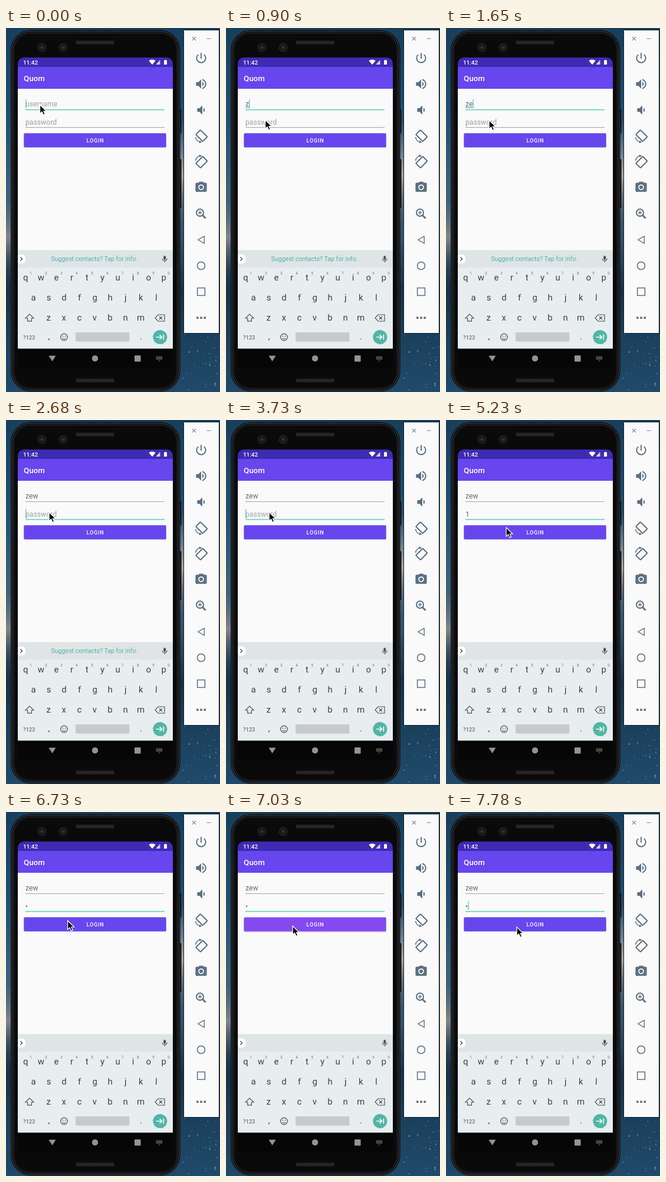
An HTML page that plays this animation: 363 by 617 pixels, repeating every 8 s.

```html
<!DOCTYPE html>
<html lang="en">
<head>
<meta charset="utf-8">
<title>Login screen</title>
<style>
html, body { margin: 0; width: 100%; height: 100%; overflow: hidden; background: #173a57; }
svg { display: block; width: 363px; height: 617px; font-family: Roboto, sans-serif; }
.mid { text-anchor: middle; }
.icon { fill: #5b7080; }
.line { fill: none; stroke: #5b7080; stroke-width: 2; }
.key { fill: #3b4347; font-size: 15px; }
.hint { fill: #a0a0a0; font-size: 12.2px; }
.typed { fill: #6a6a6a; font-size: 12.2px; }
</style>
</head>
<body>
<svg viewBox="0 0 363 617">
  <defs>
    <linearGradient id="sky" x2="0" y2="1">
      <stop offset="0" stop-color="#173f5c"/>
      <stop offset=".25" stop-color="#1f5075"/>
      <stop offset=".45" stop-color="#3b637f"/>
      <stop offset=".58" stop-color="#34526b"/>
      <stop offset=".72" stop-color="#16324a"/>
      <stop offset=".86" stop-color="#1b415d"/>
      <stop offset="1" stop-color="#20496a"/>
    </linearGradient>
    <linearGradient id="ridge" x2="0" y2="1">
      <stop offset="0" stop-color="#8796a5" stop-opacity="0"/>
      <stop offset=".5" stop-color="#b3a59e"/>
      <stop offset="1" stop-color="#3a4b5e" stop-opacity="0"/>
    </linearGradient>
    <pattern id="mesh" width="3" height="3" patternUnits="userSpaceOnUse">
      <rect width="3" height="3" fill="#151515"/>
      <path d="M0 3 3 0M0 0 3 3" stroke="#3c3c3c" stroke-width=".7"/>
    </pattern>
    <clipPath id="screen"><path d="M20 576V62q0-12 12-12h239q12 0 12 12v514z"/></clipPath>
  </defs>

  <rect width="363" height="617" fill="url(#sky)"/>
  <rect x="294" y="160" width="8" height="180" fill="url(#ridge)"/>
  <rect y="290" width="10" height="130" fill="url(#ridge)" opacity=".6"/>
  <g id="stars" fill="#c4d8e6"></g>

  <!-- phone -->
  <rect x="293" y="137" width="4.5" height="42" rx="1.5" fill="#231e1d"/>
  <rect x="293" y="222" width="4.5" height="83" rx="1.5" fill="#231e1d"/>
  <rect x="8" y="3.5" width="287.5" height="612.5" rx="34" fill="#080809"/>
  <rect x="10" y="5.5" width="283.5" height="608.5" rx="32" fill="none" stroke="#3b3c3f" stroke-width="1.4"/>
  <rect x="13" y="8.5" width="277.5" height="602.5" rx="29" fill="#0a0a0b" stroke="#343538"/>
  <rect x="118" y="21.5" width="66" height="6" rx="3" fill="url(#mesh)"/>
  <rect x="118" y="594.5" width="66" height="6" rx="3" fill="url(#mesh)"/>
  <g fill="#191919" stroke="#272727">
    <circle cx="61" cy="33" r="7"/><circle cx="97" cy="33" r="7"/>
  </g>
  <g fill="#36302e"><circle cx="61" cy="33" r="2.5"/><circle cx="97" cy="33" r="2.5"/></g>

  <g clip-path="url(#screen)">
    <rect x="20" y="50" width="263" height="526" fill="#060606"/>
    <rect x="20" y="103" width="263" height="274" fill="#fafafa"/>
    <rect x="20" y="50" width="263" height="16" fill="#3d2bb2"/>
    <rect x="20" y="66" width="263" height="37" fill="#6746ee"/>
    <g fill="#fff">
      <text x="29" y="62" font-size="9.9" font-weight="500">11:42</text>
      <path d="M242.3 55.6q5.7-4 11.4 0l-5.7 6.7z"/>
      <path d="M254 62h7.5v-8z" opacity=".75"/>
      <path d="M268 55h1.2v-1h2.6v1h1.2v7h-5z"/>
      <text x="30" y="90" font-size="13.3" font-weight="500">Quom</text>
    </g>

    <!-- form -->
    <text id="userHint" class="hint" x="33" y="133.3">username</text>
    <text id="user" class="typed" x="33" y="133.3"></text>
    <rect id="compose" x="33" y="134.4" height="1" fill="#777"/>
    <rect id="userLine" x="33" width="236"/>
    <text id="passHint" class="hint" x="33" y="163.5">password</text>
    <text id="pass" class="typed" x="33" y="163.5"></text>
    <rect id="passLine" x="33" width="236"/>
    <rect id="caret" width="1.4" height="15" fill="#62cfbc"/>
    <rect id="shadow" x="30" width="242" height="25" rx="2.5" fill="#40307a" opacity=".22"/>
    <rect id="button" x="30.4" y="178.4" width="241.2" height="23.8" rx="2"/>
    <text class="mid" x="151.5" y="193.8" fill="#fff" font-size="9" font-weight="500" letter-spacing=".8">LOGIN</text>

    <!-- keyboard -->
    <rect x="20" y="376.5" width="263" height="30" fill="#dfe4e7"/>
    <rect x="20" y="406" width="263" height="137.5" fill="#e8edf0"/>
    <circle cx="25.5" cy="391.5" r="8" fill="#fff"/>
    <path d="m24.3 388.3 3.2 3.2-3.2 3.2" fill="none" stroke="#444" stroke-width="1.3"/>
    <text id="suggest" class="mid" x="150" y="395.4" font-size="10.63" fill="#51b5a4">Suggest contacts? Tap for info.</text>
    <rect x="267.2" y="386" width="4" height="7.2" rx="2" fill="#50585c"/>
    <path d="M265.2 390.8a4 4 0 0 0 8 0M269.2 394.8v2.4" fill="none" stroke="#50585c" stroke-width="1.2"/>
    <g id="keys"></g>
    <g fill="none" stroke="#4b5357" stroke-width="1.2">
      <path d="m40 485-7 7h3.6v4.8h6.8V492H47z"/>
      <path d="M258 486h11v11h-11l-5-5.5zM260 489l5 5m0-5-5 5"/>
      <circle cx="98.5" cy="524" r="5.8"/>
      <path d="M95.5 525.8q3 3 6 0"/>
    </g>
    <g fill="#4b5357"><circle cx="96.5" cy="522.3" r=".9"/><circle cx="100.5" cy="522.3" r=".9"/></g>
    <text x="29" y="527.5" font-size="9.4" fill="#4b5357">?123</text>
    <text class="key mid" x="73" y="528">,</text>
    <text class="key mid" x="229" y="528">.</text>
    <rect x="118" y="516" width="91.5" height="15.5" rx="1.5" fill="#c6cacc"/>
    <circle cx="261.3" cy="524" r="12" fill="#51b6a6"/>
    <path d="M255 524h9.5m-4-4 4 4-4 4M267.3 519.5v9" fill="none" stroke="#fff" stroke-width="1.5"/>

    <!-- navigation bar -->
    <g fill="#949494">
      <path d="M72.5 555.5h12l-6 9.5z"/>
      <circle cx="151" cy="560" r="5.2"/>
      <rect x="218" y="555" width="10.5" height="10.5" rx="1"/>
      <rect x="254.5" y="556.5" width="10.5" height="5.5" rx=".8" opacity=".6"/>
      <path d="m258 563.5 2 2 2-2z" opacity=".6"/>
    </g>
    <path d="M255.5 558.2h8.5M255.5 560.2h8.5" stroke="#060606" stroke-dasharray="1.2 .8"/>
  </g>

  <!-- side toolbar -->
  <rect x="301.5" y="3.5" width="60" height="514" fill="#fbfafb" stroke="#101c28"/>
  <path d="m315.8 14.8 6.4 6.4m0-6.4-6.4 6.4M340.5 18h7" stroke="#777f85" stroke-width="1.1"/>
  <g id="tools" class="icon"></g>
  <g class="line">
    <g id="turn">
      <rect x="326.3" y="174.3" width="11" height="16.5" rx="1" transform="rotate(-45 331.8 182.6)"/>
      <path d="M321.5 185a10 10 0 0 0 8.5 8.5" stroke-width="1.6"/>
      <path d="m328.2 190.5 4.3 3.2-4.8 1.6z" fill="#5b7080" stroke="none"/>
    </g>
    <use href="#turn" transform="matrix(1 0 0 -1 0 410)"/>
    <circle cx="329" cy="313" r="6"/>
    <path d="m333.3 317.3 5.4 5.4" stroke-width="2.8"/>
    <path d="M326 313h6m-3-3v6" stroke-width="1.5"/>
    <path d="M336.2 353v12l-10.4-6z" stroke-width="1.4"/>
    <circle cx="331" cy="403" r="6.5" stroke-width="1.6"/>
    <rect x="324.6" y="440.6" width="12.8" height="12.8" stroke-width="1.5"/>
  </g>
  <g class="icon"><circle cx="324.8" cy="491.2" r="2"/><circle cx="331" cy="491.2" r="2"/><circle cx="337.2" cy="491.2" r="2"/></g>

  <path id="pointer" d="M-.4-.3V14.6L3-.3 3 11.4l2.6 5.5 2.6-1.1-2.4-5.3h4.7z" fill="#000" stroke="#fff" stroke-width="1.2"/>
</svg>

<script>
const $ = id => document.getElementById(id);

function add(parent, tag, attrs, text = '') {
  const node = document.createElementNS('http://www.w3.org/2000/svg', tag);
  for (const [name, value] of Object.entries(attrs)) node.setAttribute(name, value);
  node.textContent = text;
  $(parent).append(node);
}

function keyRow(letters, x, y) {
  [...letters].forEach((letter, i) =>
    add('keys', 'text', { class: 'key mid', x: x + i * 26.05, y }, letter));
}
keyRow('qwertyuiop', 33.3, 428);
keyRow('asdfghjkl', 46.5, 461.7);
keyRow('zxcvbnm', 72.3, 495.5);
[...'1234567890'].forEach((digit, i) =>
  add('keys', 'text', { class: 'mid', x: 42 + i * 26, y: 417.5, 'font-size': 6.3, fill: '#70787c' }, digit));

const speaker = 'M3 9v6h4l5 5V4L7 9zm13.5 3A4.5 4.5 0 0 0 14 8v8a4.5 4.5 0 0 0 2.5-4z';
const tools = [
  [51, 'M13 3h-2v10h2zm4.8 2.2-1.4 1.4A7 7 0 1 1 7.6 6.6L6.2 5.2a9 9 0 1 0 11.6 0z'],
  [95, speaker + 'M14 3.2v2.1a7 7 0 0 1 0 13.4v2.1a9 9 0 0 0 0-17.6z'],
  [139, speaker],
  [270, 'M9 2 7.2 4H4a2 2 0 0 0-2 2v12a2 2 0 0 0 2 2h16a2 2 0 0 0 2-2V6a2 2 0 0 0-2-2h-3.2L15 2zm3 15a5 5 0 1 1 0-10 5 5 0 0 1 0 10zm0-1.8a3.2 3.2 0 1 0 0-6.4 3.2 3.2 0 0 0 0 6.4z']
];
for (const [y, d] of tools)
  add('tools', 'path', { d, transform: `translate(${d === speaker ? 333 : 331} ${y}) scale(.96) translate(-12 -12)` });

let seed = 7;
const random = () => (seed = seed * 16807 % 2147483647) / 2147483647;
for (let i = 0; i < 44; i++)
  add('stars', 'circle', { cx: 298 + random() * 64, cy: 519 + random() * 97, r: .4 + random() * .6, opacity: .3 + random() * .6 });

// Each step overrides part of the state from its time on.
const LOOP = 8000;
const steps = [
  [0, { user: '', pass: '', focus: 'user', caret: true, suggest: true, press: 0, pointer: [58, 130.5] }],
  [450, { user: 'z' }],
  [750, { pointer: [63, 144] }],
  [900, { pointer: [67, 156] }],
  [1200, { caret: false, pointer: [70, 157] }],
  [1350, { pointer: [72, 157] }],
  [1500, { user: 'ze', caret: true, pointer: [73, 156.5] }],
  [1650, { pointer: [73.5, 156.5] }],
  [1950, { user: 'zew' }],
  [2240, { caret: false }],
  [2540, { focus: 'pass', caret: true }],
  [3130, { caret: false }],
  [3430, { suggest: false }],
  [3730, { caret: true }],
  [4330, { pass: '1' }],
  [4780, { caret: false, pointer: [80, 161] }],
  [4930, { pointer: [91, 171] }],
  [5080, { pointer: [99, 179] }],
  [5230, { pointer: [102.5, 182.5] }],
  [5380, { caret: true, pointer: [103.5, 183.5] }],
  [5530, { pointer: [104, 184] }],
  [5830, { pass: '•', caret: false }],
  [6730, { pointer: [105, 184.5] }],
  [6880, { pointer: [110, 190] }],
  [7030, { press: 1, pointer: [113.5, 193.5] }],
  [7180, { pointer: [117, 194.5] }],
  [7330, { caret: true, pointer: [119, 195] }],
  [7480, { press: .7, pointer: [120.5, 195.3] }],
  [7630, { press: .4 }],
  [7780, { press: 0 }]
];

const show = (id, on) => { $(id).style.display = on ? '' : 'none'; };

function set(id, attrs) {
  for (const [name, value] of Object.entries(attrs)) $(id).setAttribute(name, value);
}

function drawField(id, state, y) {
  const active = state.focus === id;
  $(id).textContent = state[id];
  show(id + 'Hint', !state[id]);
  set(id + 'Line', active
    ? { y: y - .2, height: 1.6, fill: '#62cfbc' }
    : { y, height: 1, fill: '#a5a5a5' });
  const width = state[id] ? $(id).getComputedTextLength() : 0;
  if (active) set('caret', { x: 33 + width, y: y - 17 });
  return width;
}

function draw(time) {
  const state = Object.assign({}, ...steps.filter(([at]) => at <= time).map(step => step[1]));
  const userWidth = drawField('user', state, 138);
  drawField('pass', state, 168);
  set('compose', { width: userWidth });
  show('compose', state.focus === 'user' && state.user);
  show('caret', state.caret);
  show('suggest', state.suggest);
  const mix = (from, to) => Math.round(from + (to - from) * state.press);
  set('button', { fill: `rgb(${mix(103, 132)},${mix(70, 74)},${mix(238, 240)})` });
  set('shadow', { y: 178 + state.press });
  set('pointer', { transform: `translate(${state.pointer})`, d: 'M-.4-.3V14.6L3 11.4l2.6 5.5 2.6-1.1-2.4-5.3h4.7z' });
}

const start = performance.now();
function tick() {
  draw((performance.now() - start) % LOOP);
  requestAnimationFrame(tick);
}
tick();
</script>
</body>
</html>
```
